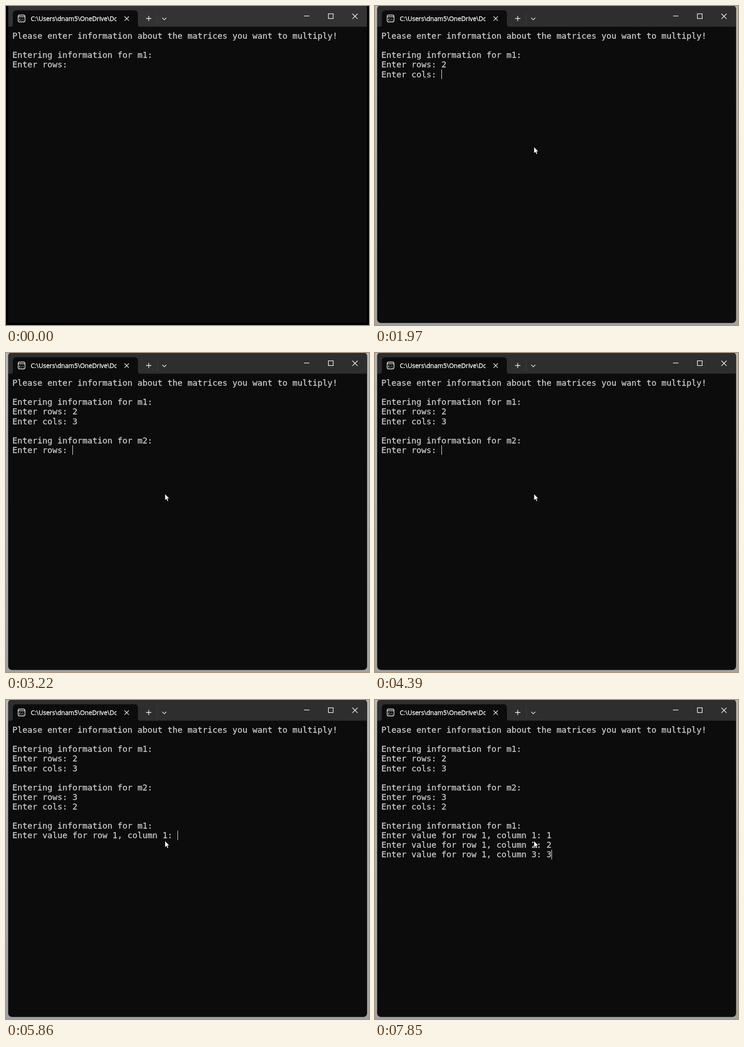
Write an HTML page that moves like this. It is 798x702 px and loops after 8000 ms.

```html
<!DOCTYPE html>
<html lang="en">
<head>
<meta charset="utf-8">
<title>Matrix multiplication in a terminal</title>
<style>
  html, body { margin: 0; width: 100%; height: 100%; overflow: hidden; background: #000; }
  svg { display: block; width: 798px; height: 702px; }
  #rows text { font: 18.272px "DejaVu Sans Mono", "Noto Sans Mono", monospace; fill: #ccc; stroke: #ccc; stroke-width: 0.3; }
  .title { font: 13.65px "Open Sans", "Noto Sans", sans-serif; fill: #fff; stroke: #fff; stroke-width: 0.35; }
  .glyph { font: 700 6px "DejaVu Sans Mono", monospace; fill: #fff; }
  .icons { fill: none; stroke: #fff; stroke-width: 1.3; }
  #backdrop, #pointer { visibility: hidden; }
  .active #backdrop, .active #pointer { visibility: visible; }
  #bar { fill: #333; }
  .active #bar { fill: #2e2e2e; }
</style>
</head>
<body>
<svg id="stage" viewBox="0 0 798 702">
  <defs>
    <linearGradient id="desk" x1="0" y1="0" x2="0" y2="1">
      <stop offset="0" stop-color="#b8b8b8"/>
      <stop offset="1" stop-color="#a2a2a2"/>
    </linearGradient>
    <clipPath id="frame"><rect id="shape" x="5" y="-1" width="788.5" height="698.3"/></clipPath>
    <clipPath id="label"><rect x="54" y="12" width="189" height="30"/></clipPath>
  </defs>

  <rect width="798" height="702" fill="#000"/>
  <g id="backdrop">
    <rect width="798" height="702" fill="url(#desk)"/>
    <rect x="4.5" y="-1.5" width="789.5" height="699.3" rx="8.5" fill="#505050"/>
  </g>

  <g clip-path="url(#frame)">
    <rect x="5" y="-1" width="789" height="699" fill="#0c0c0c"/>
    <rect id="bar" x="5" y="-1" width="789" height="46.5"/>
    <path fill="#0c0c0c" d="M10 46 Q15 45.5 15 40.5 V17.5 Q15 9.5 23 9.5 H282 Q290 9.5 290 17.5 V40.5 Q290 45.5 295 46 Z"/>
    <path d="M332.5 14 V41" stroke="#404040"/>
    <g class="icons">
      <rect x="26.7" y="20" width="15" height="15" rx="3"/>
      <path d="M27 23.6 H41.5"/>
      <path d="M260.5 23 l9.6 9.6 m0 -9.6 l-9.6 9.6"/>
      <path d="M308 27.5 h11.5 m-5.75 -5.75 v11.5"/>
      <path d="M343.6 26 l4.4 4.4 l4.4 -4.4"/>
      <path d="M655 22 h12"/>
      <rect x="708.7" y="17.2" width="10.6" height="10.4"/>
      <path d="M761.5 17 l11.4 11.4 m0 -11.4 l-11.4 11.4"/>
    </g>
    <text class="glyph" x="28.6" y="31.6">C:\</text>
    <g clip-path="url(#label)"><text class="title" x="54.5" y="33">C:\Users\dnam5\OneDrive\Documents</text></g>
    <g id="rows"></g>
    <rect id="caret" width="1" height="21" fill="#fff"/>
  </g>

  <path id="pointer" d="M0 0 V14.6 L3.3 11.6 L5.5 16.6 L8 15.5 L5.8 10.6 H10.2 Z"
        fill="#fff" stroke="#000" stroke-width="0.9" stroke-linejoin="round"/>
</svg>

<script>
const LOOP = 8000;
const LEFT = 14, TOP = 55.3, COL = 11, ROW = 21.1, BASE = 16.8;
const ASK = "Entering information for ";
const cell = n => `Enter value for row 1, column ${n}: `;

// [time, text appended to the screen, caret visible]
const events = [
  [0, `Please enter information about the matrices you want to multiply!\n\n${ASK}m1:\nEnter rows: `, false],
  [1970, "2\nEnter cols: ", true],
  [2520, "3", true],
  [3220, `\n\n${ASK}m2:\nEnter rows: `, true],
  [3860, "", false],
  [4390, "", true],
  [5020, "3", true],
  [5270, "\nEnter cols: ", true],
  [5600, "2", true],
  [5770, `\n\n${ASK}m1:\n${cell(1)}`, false],
  [5860, "", true],
  [6520, "", false],
  [6690, "1", true],
  [6960, "\n" + cell(2), true],
  [7310, "2", true],
  [7490, "\n" + cell(3), true],
  [7850, "3", true]
];

const $ = id => document.getElementById(id);
const set = (el, attrs) => { for (const k in attrs) el.setAttribute(k, attrs[k]); };

const rows = Array.from({ length: 14 }, (_, i) => {
  const el = document.createElementNS("http://www.w3.org/2000/svg", "text");
  set(el, { x: LEFT, y: TOP + i * ROW + BASE });
  return $("rows").appendChild(el);
});

function draw(t) {
  const past = events.filter(e => e[0] <= t);
  const lines = past.map(e => e[1]).join("").split("\n");
  rows.forEach((el, i) => {
    const text = lines[i] || "";
    if (el.textContent !== text) el.textContent = text;
  });

  const last = lines.length - 1;
  set($("caret"), {
    x: LEFT + lines[last].length * COL,
    y: TOP + last * ROW,
    visibility: past[past.length - 1][2] ? "visible" : "hidden"
  });

  const active = t >= 870;
  $("stage").classList.toggle("active", active);
  set($("shape"), { rx: active ? 8 : 0 });
  set($("pointer"), { transform: t < 1970 ? "translate(78.8 366.5)" : "translate(349.3 309.8)" });
}

function tick() {
  draw(performance.now() % LOOP);
  requestAnimationFrame(tick);
}
tick();
</script>
</body>
</html>
```
